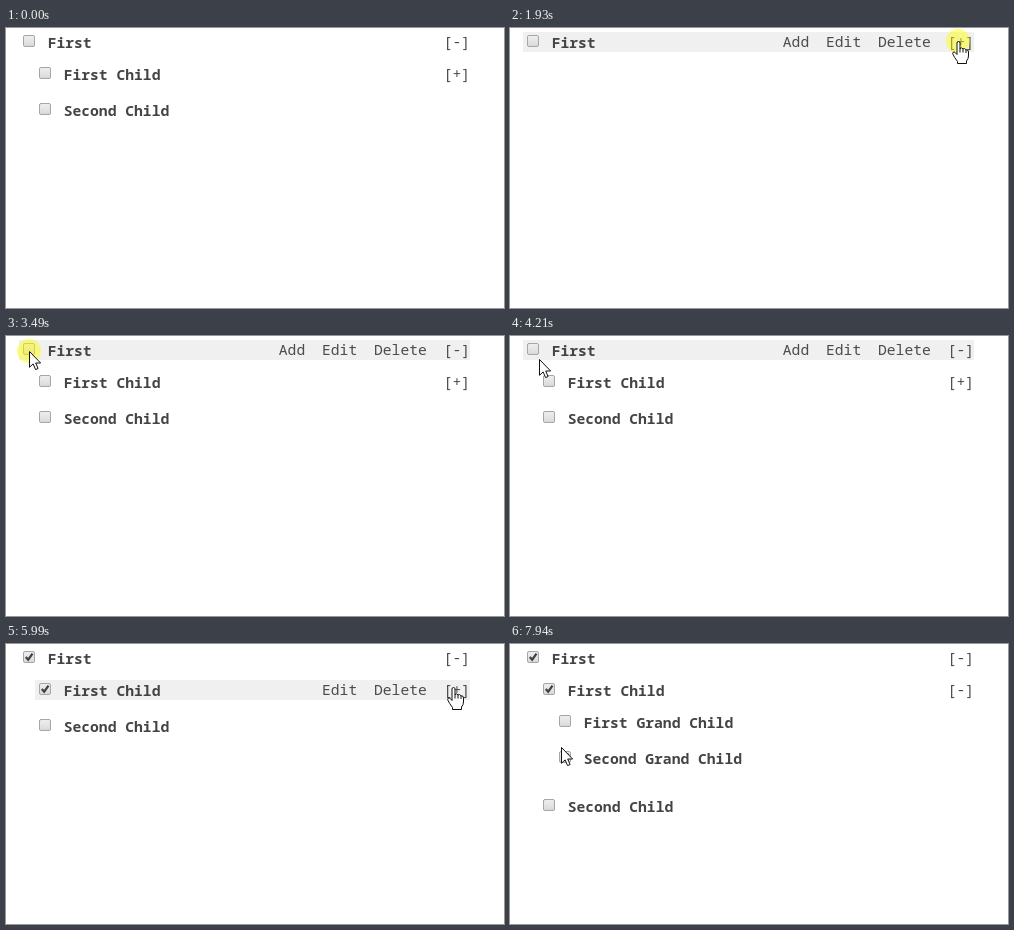
An HTML page that plays this animation: 498 px wide and 280 px high, repeating every 8000 ms.

```html
<!DOCTYPE html>
<html lang="en">
<head>
<meta charset="utf-8">
<title>Checkbox tree</title>
<style>
html, body { margin: 0; width: 100%; height: 100%; overflow: hidden; background: #fff; }
svg { display: block; width: 498px; height: 280px; }
text { font: 14.667px "Noto Sans Mono", "DejaVu Sans Mono", monospace; fill: #4c4c4c; white-space: pre; }
.name { font-weight: 700; fill: #444; }
.band { fill: #f0f0f0; }
.box { fill: url(#face); stroke: #a6a6a6; }
.tick { fill: none; stroke: #3f3f3f; stroke-width: 2.2; }
.click { fill: #ff0; fill-opacity: .47; }
.ptr { fill: #fff; stroke: #111; stroke-linejoin: round; }
.beam { fill: none; stroke: #111; }
</style>
</head>
<body>
<svg viewBox="0 0 498 280">
  <defs>
    <linearGradient id="face" x1="0" y1="0" x2="0" y2="1">
      <stop offset="0" stop-color="#efefef"/><stop offset="1" stop-color="#d9d9d9"/>
    </linearGradient>
    <g id="arrow"><path class="ptr" d="M.5 .5V16.3L4.1 12.9L6.6 18.6L9.1 17.5L6.7 12H11.6Z"/></g>
    <g id="hand">
      <path class="ptr" d="M-1 2Q-1 .5 .5 .5Q2 .5 2 2V7.4Q3.6 6.2 5 7.9Q6.8 6.9 8 8.8Q10.5 8.4 10.5 11V15Q10.5 17.5 8.5 20V22.5H-.5V20.5Q-4 16 -5.3 12.8Q-5.5 10.8 -3.8 11Q-2.5 11.4 -1 13.5Z"/>
      <path class="beam" d="M2 7V11.5M5 8V11.5M8 9V12"/>
    </g>
    <g id="beam"><path class="beam" d="M-2.5 -6.5H-.5L.5 -5.5L1.5 -6.5H3.5M.5 -5.5V6.5M-2.5 7.5H-.5L.5 6.5L1.5 7.5H3.5"/></g>
  </defs>
  <g id="view"></g>
</svg>
<script>
const LOOP = 8000, STEP = 77, CHAR = 8.8, GAP = 16.8, RIGHT = 464;

// The pointer glides from stop to stop, sampled once per STEP
const entry = { x: 455, y: 270 };
const stops = [
  { from: 380, to: 920, x: 449, y: 21 },
  { from: 1000, to: 1080, x: 448, y: 13 },
  { from: 2640, to: 3030, x: 20, y: 30 },
  { from: 3110, to: 3190, x: 9, y: 22 },
  { from: 3260, to: 3410, x: 23, y: 15 },
  { from: 4210, to: 4210, x: 29, y: 23 },
  { from: 4290, to: 4590, x: 37, y: 46 },
  { from: 5050, to: 5440, x: 397, y: 50 },
  { from: 5840, to: 5990, x: 447, y: 43 },
  { from: 6450, to: 6770, x: 72, y: 73 },
  { from: 6920, to: 7090, x: 57, y: 78 },
  { from: 7870, to: 7940, x: 51, y: 103 }
];

// A press lights up at "down" and takes effect at "up"
const presses = [
  { down: 1230, up: 1380, act: "fold" },
  { down: 1930, up: 2010, act: "fold" },
  { down: 3490, up: 3640, act: "all" },
  { down: 3960, up: 4040, act: "all" },
  { down: 4740, up: 4820, act: "child" },
  { down: 6140, up: 6220, act: "open" },
  { down: 7240, up: 7370, act: "grandchild" }
];

const smooth = u => u * u * (3 - 2 * u);

function pointer(t) {
  let at = null, prev = entry;
  for (const stop of stops) {
    if (t < stop.from) break;
    const count = Math.round((stop.to - stop.from) / STEP) + 1;
    const done = Math.floor((t - stop.from + 8) / STEP) + 1;
    const p = smooth(Math.min(1, done / count));
    const mix = k => Math.round(prev[k] + (stop[k] - prev[k]) * p);
    at = { x: mix("x"), y: mix("y") };
    prev = stop;
  }
  return at;
}

function rowsAt(t) {
  const flipped = act => presses.filter(p => p.act === act && t >= p.up).length % 2 === 1;
  const open = flipped("open"), all = flipped("all"), some = all || flipped("child");
  const row = (name, depth, top, on, toggle) => ({ name, depth, top, on, toggle });
  if (flipped("fold")) return [row("First", 0, 4, some, "[+]")];
  return [
    row("First", 0, 4, some, "[-]"),
    row("First Child", 1, 36, some, open ? "[-]" : "[+]"),
    ...(open ? [
      row("First Grand Child", 2, 68, !flipped("grandchild")),
      row("Second Grand Child", 2, 104, true)
    ] : []),
    row("Second Child", 1, open ? 152 : 72, all)
  ];
}

const label = (s, x, y, cls = "") => `<text class="${cls}" x="${x.toFixed(1)}" y="${y}">${s}</text>`;

function checkbox(x, y, on) {
  return `<rect class="box" x="${x + .5}" y="${y + .5}" width="11" height="11" rx="1.5"/>` +
    (on ? `<path class="tick" d="M${x + 2.8} ${y + 6}l2.4 2.7l4.3 -6"/>` : "");
}

function draw(t) {
  const at = pointer(t);
  let out = "", shape = "arrow";
  for (const { name, depth, top, on, toggle } of rowsAt(t)) {
    const left = 13 + 16 * depth, textX = left + 28.7;
    const over = (a, b) => at && at.x >= a && at.x < b && at.y >= top && at.y < top + 20;
    const hover = over(left, RIGHT);
    if (hover) out += `<rect class="band" x="${left}" y="${top}" width="${RIGHT - left}" height="20"/>`;
    if (over(textX - 2, textX + name.length * CHAR)) shape = "beam";
    out += checkbox(left + 4, top + 3, on) + label(name, textX, top + 16, "name");

    const links = toggle ? [toggle] : [];
    if (hover) links.push("Delete", "Edit");
    if (hover && depth === 0) links.push("Add");
    let end = RIGHT;
    for (const word of links) {
      const x = end - word.length * CHAR;
      out += label(word, x, top + 15);
      if (over(x, end)) shape = "hand";
      end = x - GAP;
    }
  }
  if (at) {
    if (presses.some(p => t >= p.down && t < p.up)) out += `<circle class="click" cx="${at.x}" cy="${at.y}" r="12"/>`;
    out += `<use href="#${shape}" x="${at.x}" y="${at.y}"/>`;
  }
  return out;
}

const view = document.getElementById("view");
const begin = performance.now();
let last = "";

function tick(now) {
  const next = draw(Math.max(0, now - begin) % LOOP);
  if (next !== last) view.innerHTML = last = next;
  requestAnimationFrame(tick);
}
tick(begin);
</script>
</body>
</html>
```
